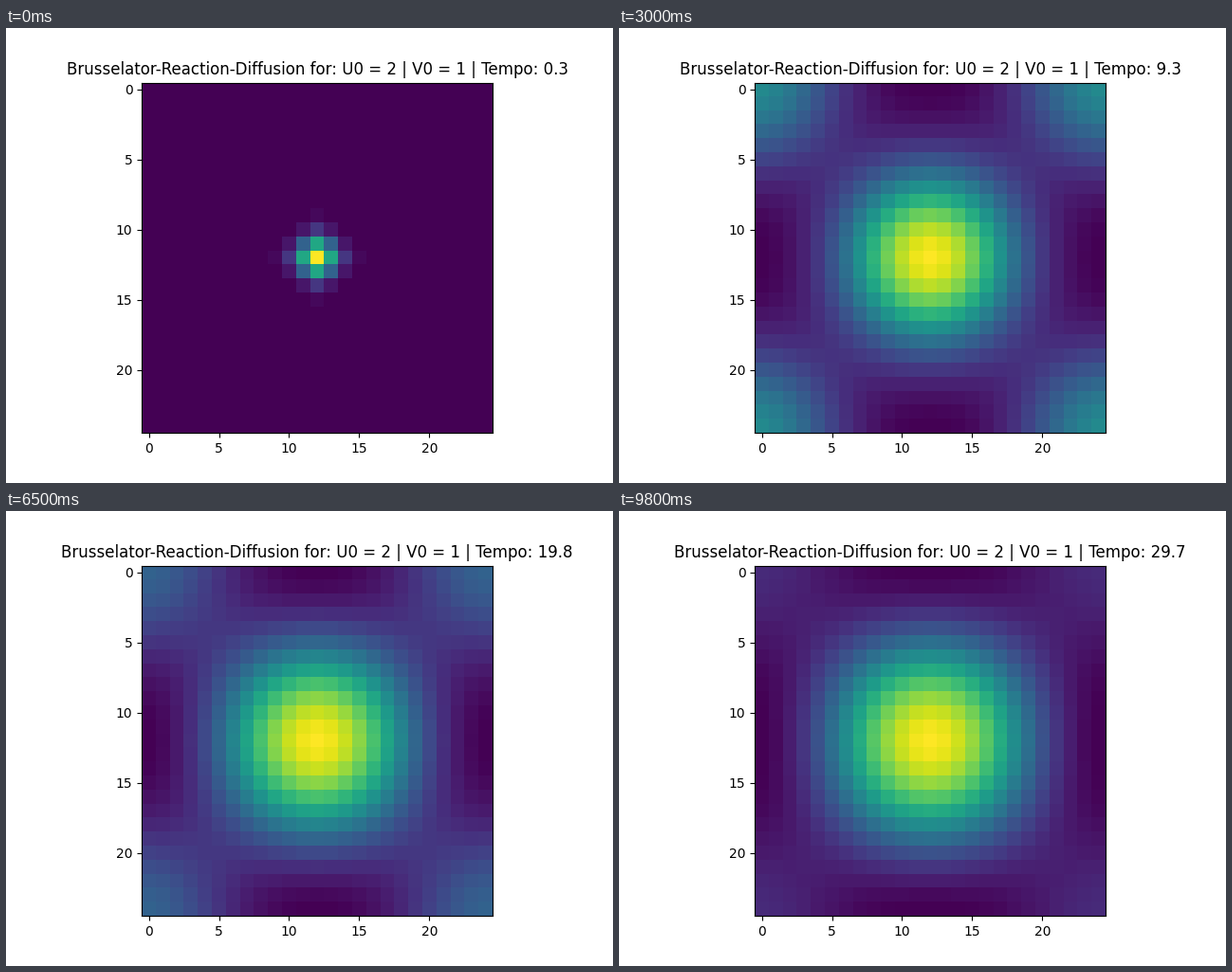
A matplotlib script that plays this animation: 640 px wide and 480 px high, repeating every 9.9 s.

```python
import numpy as np
import matplotlib.pyplot as plt
from matplotlib.animation import FuncAnimation

N = 25
MID = N // 2
STEP = 0.3
FRAMES = 99
HOLD = 10   # frames between two field updates
CYCLE = 4   # every fourth update the centre is a dip


def normalise(u):
    return (u - u.min()) / (u.max() - u.min())


def seed_field(steps=3, rate=0.15):
    """A single hot cell after a few explicit diffusion steps."""
    u = np.zeros((N, N))
    u[MID, MID] = 1
    for _ in range(steps):
        around = sum(np.roll(u, d, axis) for d in (-1, 1) for axis in (0, 1))
        u = u + rate * (around - 4 * u)
    return normalise(u)


def blob(center, spread):
    """Round Gaussian on the diagonal, repeated beyond the walls."""
    d = np.arange(N) - center
    line = sum(np.exp(-(d + N * m) ** 2 / spread) for m in (-1, 0, 1))
    return np.outer(line, line)


def pattern(stage):
    """Central blob and weaker corner blobs that widen and fade with time."""
    t = stage * HOLD * STEP
    dip = stage % CYCLE == 0
    spread = 24 + 1.8 * t
    corner = 0.59 - 0.009 * t
    sharp = 1
    if dip:
        # dips start out steep, with flat ground between the blobs
        sharp = 1 + (8 / t) ** 2
        corner *= 1.2 * sharp
    mid = blob(MID, spread)
    rim = corner * blob(-0.5, spread)
    u = normalise((mid ** sharp + rim ** sharp) ** (1 / sharp)) ** sharp
    return 1 - u if dip else u


def field(i):
    stage = (i + 1) // HOLD
    if stage == 0:
        return seed_field()
    return pattern(stage - (stage == 2))  # the second update repeats the first


fig, ax = plt.subplots(figsize=(6.4, 4.8), dpi=100)
image = ax.imshow(field(0), cmap="viridis", vmin=0, vmax=1)
title = ax.set_title("")


def update(i):
    image.set_data(field(i))
    title.set_text("Brusselator-Reaction-Diffusion for: U0 = 2 | V0 = 1 | "
                   f"Tempo: {STEP * (i + 1):.1f}")
    return image, title


anim = FuncAnimation(fig, update, frames=FRAMES, interval=100, repeat=True)
plt.show()
```
